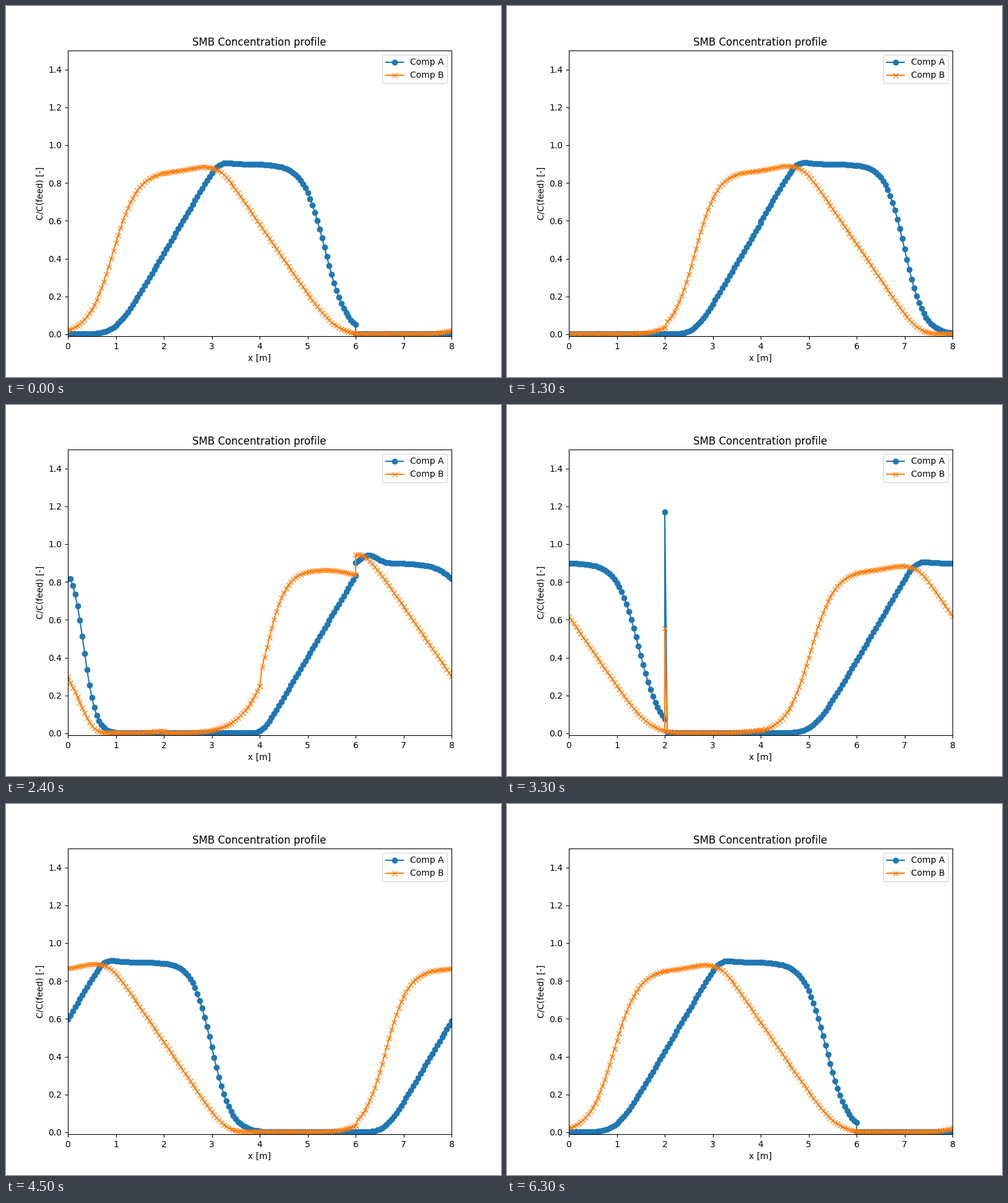
These frames come from a looping animation (800 by 600 pixels, 6.4 s). A matplotlib script:

```python
import numpy as np
import matplotlib.pyplot as plt
from matplotlib.animation import FuncAnimation

# Four columns of 2 m in a ring; the ports move on by one column per period.
COLUMNS, LENGTH, PERIOD = 4, 2.0, 16
U = LENGTH * np.arange(COLUMNS)[:, None] + np.linspace(0, LENGTH, 41)
PHASES = [1, 5, 8, 13, 15]
CARRY = 1.9  # what is left of a column length after the first step
FLOOR = .004

# Overshoot behind the last port just after a switch: first value, step values
SPIKE_A = (1.17, 1.6, 1.2)
SPIKE_B = (.555, .7, .5)


def path(phase, *stops):
    """Position of a moving feature; it starts where the last period left it."""
    return np.interp(phase, PHASES, (stops[-1] - CARRY, *stops))


def sigmoid(x):
    return .5 * (1 + np.tanh(x / 2))


def ramp(x, slope, width):
    """Straight rise from zero with a rounded foot."""
    return slope * width * np.logaddexp(0, x / width)


def soft_min(a, b, q=.03):
    return -q * np.logaddexp(-a / q, -b / q)


def hump(x, width):
    return np.exp(-(x / width) ** 2)


def zones(*values):
    """One value per column, shaped to combine with U."""
    return np.array(values)[:, None]


def join(c, spike, phase):
    """Columns without a feed start at the outlet of the one before."""
    c = np.maximum(c, FLOOR)
    c[1, 0] = c[0, -1]
    c[3, 0] = spike[phase - 1] if phase <= len(spike) else c[2, -1]
    return c


def profiles(phase):
    """Concentrations of A and B, measured from the first port."""
    swing = np.sin(np.pi * (phase - 1) / 14)   # squeeze between two switches
    feed = hump(phase - 9, 2.5)                # push of the feed port
    late = np.clip((phase - 5) / 10, 0, 1)     # progress in the last column
    last_width = max(.227 * np.sqrt(late), .0165)

    # A: straight rear, flat top, S-shaped front
    rear = path(phase, 1.80, 2.06, 2.632, 3.005)
    lead = zones(0, 0, .28 * feed, .28 * feed)
    top = .9 + (.008 + .04 * feed) * hump(U - rear - 2.2, .25)
    front = path(phase, 6.23, 6.65, 7.20, 7.36)
    last_front = path(phase, 6.015, 6.335, 7.0, 7.36)
    center = zones(front, front, front, last_front)
    width = .227 + .06 * swing
    width = zones(width, width, width, last_width)
    a = soft_min(ramp(U - rear + lead, .43, .16 - .08 * swing), top)
    a = a * sigmoid((center - U) / width)

    # B: S-shaped rear, flat top, straight front
    first = path(phase, 1.83, 2.30, 2.90, 2.94)
    second = path(phase, 1.89, 2.13, 2.63, 2.94)
    center = zones(first, second, second, second)
    wide, tight = .256 + .075 * swing, .256 - .05 * swing
    width = zones(wide, tight, tight, tight)
    foot = path(phase, 6.38, 6.81, 7.29, 7.57)
    before, after = .02 - .055 * feed, .02 + .075 * feed
    top = .865 + zones(before, before, after, after) * hump(U - foot + 2.72, .4)
    b = soft_min(top * sigmoid((U - center) / width), ramp(foot - U, .37, .2))
    reach = path(phase, 6.015, 6.40, 7.40, 8.30)
    b[3] *= sigmoid((reach - U[3]) / last_width)
    b[3] += .02 * (1 - late) * np.exp((U[3] - 8) / .4)

    return join(a, SPIKE_A, phase), join(b, SPIKE_B, phase)


def curves(n):
    shift, phase = divmod(n, PERIOD)
    if phase == 0:  # the end state is held for one frame
        shift, phase = shift - 1, PERIOD - 1
    return [np.roll(c, shift, axis=0).ravel() for c in profiles(phase)]


fig, ax = plt.subplots(figsize=(8, 6), dpi=100)
a0, b0 = curves(0)
line_a, = ax.plot(U.ravel(), a0, "o-", color="#1f77b4", label="Comp A")
line_b, = ax.plot(U.ravel(), b0, "x-", color="#ff7f0e", label="Comp B")
ax.set(xlim=(0, 8), ylim=(-.01, 1.5), xlabel="x [m]", ylabel="C/C(feed) [-]")
ax.set_title("SMB Concentration profile", x=.4985)
ax.legend(loc="upper right")


def update(n):
    for line, c in zip((line_a, line_b), curves(n)):
        line.set_ydata(c)
    return line_a, line_b


anim = FuncAnimation(fig, update, frames=COLUMNS * PERIOD, interval=100,
                     repeat=True, repeat_delay=0)
plt.show()
```
